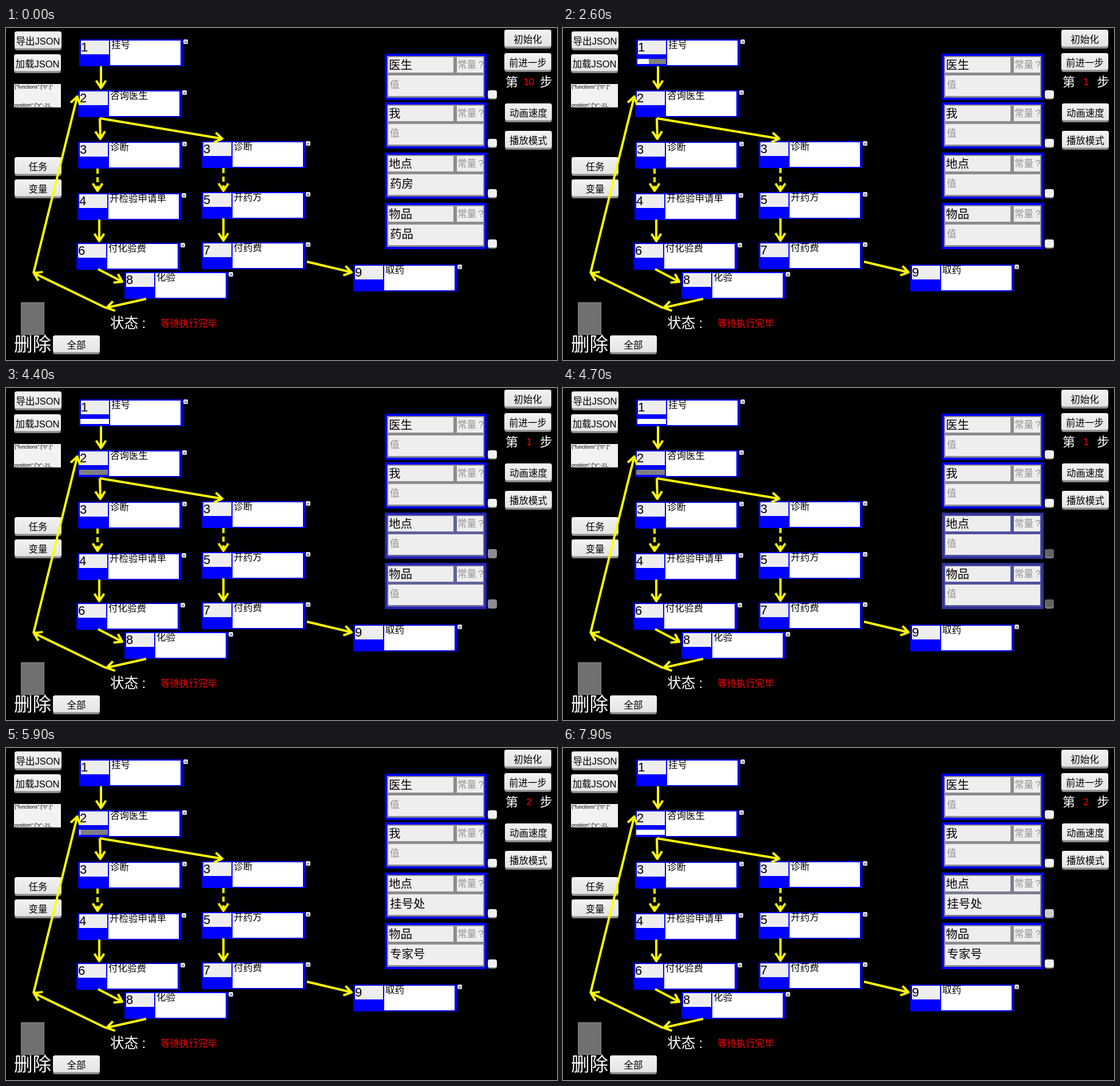
Write an HTML page with a canvas that moves like this. It is 963 px wide and 581 px high and loops after 8000 ms.

```html
<!DOCTYPE html>
<html lang="zh-CN">
<head>
<meta charset="utf-8">
<style>
html, body { margin: 0; width: 100%; height: 100%; overflow: hidden; background: #000; }
canvas { display: block; }
</style>
</head>
<body>
<canvas id="stage" width="963" height="581"></canvas>
<script>
const ctx = document.getElementById('stage').getContext('2d');
const LOOP = 8000, TICK = 100;
const BLUE = '#00f', PALE = '#eee', GREY = '#808080', FAINT = '#929292';

const tasks = [
  [128, 20, 1, '挂号'], [126, 109, 2, '咨询医生'], [126, 199, 3, '诊断'],
  [342, 198, 3, '诊断'], [125, 289, 4, '开检验申请单'], [342, 287, 5, '开药方'],
  [123, 376, 6, '付化验费'], [342, 375, 7, '付药费'], [207, 427, 8, '化验'],
  [607, 414, 9, '取药']
];

// tail x, y, tip x, y, dashed
const arrows = [
  [166, 67, 166, 107], [164, 158, 165, 196], [164, 158, 380, 194],
  [160, 246, 160, 287, 1], [380, 245, 380, 287, 1], [163, 335, 163, 375],
  [380, 333, 380, 374], [161, 422, 205, 445], [526, 409, 606, 428],
  [245, 474, 174, 490], [175, 490, 47, 428], [48, 429, 125, 118]
];

const buttons = [
  [15, 6, '导出JSON'], [14, 46, '加载JSON'], [15, 226, '任务'], [15, 265, '变量'],
  [82, 538, '全部'], [871, 3, '初始化'], [871, 44, '前进一步'],
  [872, 132, '动画速度'], [872, 180, '播放模式']
];

const clamp = v => Math.max(0, Math.min(1, v));
const mix = (from, to, k) =>
  `rgb(${from.map((v, i) => Math.round(v + (to[i] - v) * k))})`;

function rect(x, y, w, h, color) {
  ctx.fillStyle = color;
  ctx.fillRect(x, y, w, h);
}

function rounded(x, y, w, h, r, color) {
  ctx.fillStyle = color;
  ctx.beginPath();
  ctx.roundRect(x, y, w, h, r);
  ctx.fill();
}

// y is the vertical centre of the line
function text(s, x, y, size, color = '#000', align = 'left') {
  ctx.font = `${size}px "Liberation Sans", "Noto Sans CJK SC", "Noto Sans CJK", sans-serif`;
  ctx.textAlign = align;
  ctx.fillStyle = color;
  ctx.fillText(s, x, Math.round(y + size * 0.37));
}

function button([x, y, label], scale) {
  ctx.save();
  ctx.translate(x + 41, y + 16.5);
  ctx.scale(scale, scale);
  rounded(-41, -16.5, 82, 33, 4, '#8a8a8a');
  const shade = ctx.createLinearGradient(0, -16, 0, 13);
  shade.addColorStop(0, '#fff');
  shade.addColorStop(0.15, '#f0f0f0');
  shade.addColorStop(1, '#e4e4e4');
  rounded(-41, -16.5, 82, 29.5, 4, shade);
  text(label, 0, -0.5, 16.5, '#000', 'center');
  ctx.restore();
}

function task([x, y, id, label], bar) {
  rect(x, y, 181, 47, BLUE);
  rect(x + 3, y + 2, 49, 24, PALE);
  rect(x + 54, y + 2, 123, 43, '#fff');
  text(id, x + 3, y + 13, 22);
  text(label, x + 56, y + 9, 16.5);
  if (bar !== null) {
    rect(x + 2, y + 34, 50, 9, GREY);
    rect(x + 2, y + 34, Math.round(50 * bar), 9, '#fff');
  }
  rounded(x + 182, y, 8, 8, 2, '#e0e0e0');
  text('>', x + 186, y + 4, 8, '#000', 'center');
}

// A locked variable dims towards slate blue.
function variable(y, name, value, lock) {
  const x = 662;
  rect(x, y, 178, 81, mix([0, 0, 255], [50, 50, 150], lock));
  rect(x + 4, y + 4, 170, 73, mix([140, 140, 140], [80, 80, 160], lock));
  rect(x + 6, y + 6, 114, 27, PALE);
  rect(x + 126, y + 6, 46, 27, PALE);
  rect(x + 6, y + 38, 166, 36, PALE);
  text(name, x + 7, y + 19, 20.5);
  text('常量', x + 127, y + 18.5, 16.5, FAINT);
  text('?', x + 168, y + 18.5, 16.5, FAINT, 'center');
  if (value) text(value, x + 9, y + 54.5, 20.5);
  else text('值', x + 9, y + 54, 16.5, FAINT);
  rounded(842, y + 64, 16, 16, 4, '#888');
  rounded(842, y + 64, 16, 14, 4, mix([240, 240, 240], [100, 100, 100], lock));
}

function arrow([x1, y1, x2, y2, dashed], grown) {
  const len = Math.hypot(x2 - x1, y2 - y1) * grown - 2;
  if (len < 0) return;
  ctx.save();
  ctx.translate(x1, y1);
  ctx.rotate(Math.atan2(y2 - y1, x2 - x1));
  ctx.strokeStyle = '#ff0';
  ctx.lineWidth = 4;
  if (dashed) ctx.setLineDash([9, 6]);
  ctx.beginPath();
  ctx.moveTo(0, 0);
  ctx.lineTo(len, 0);
  ctx.stroke();
  ctx.setLineDash([]);
  ctx.lineJoin = 'round';
  ctx.beginPath();
  ctx.moveTo(len - 13, -8.5);
  ctx.lineTo(len, 0);
  ctx.lineTo(len - 13, 8.5);
  ctx.stroke();
  ctx.restore();
}

function state(t) {
  const waiting = '等待执行完毕';
  const rise = start => Math.sin(clamp((t - start) / 600) * Math.PI / 2);
  const lock = rise(4100) * clamp((5000 - t) / 200);
  const grow = start => t < start ? 1 : clamp((t - start) / 300);
  const s = {
    step: 10, status: waiting, place: '药房', item: '药品',
    bars: [null, null],
    locks: [lock + rise(7800), lock],
    grown: [grow(3900), grow(7600), grow(7600)],
    pressed: null
  };
  if (t >= 1100) Object.assign(s, { step: 0, status: '过程模式', place: '', item: '' });
  if (t >= 2300) {
    Object.assign(s, { step: 1, status: waiting });
    s.bars[0] = clamp((t - 2310) / 710);
  }
  if (t >= 4300) s.bars[1] = 0;
  if (t >= 4900) Object.assign(s, { status: '继续下一步', place: '挂号处', item: '专家号' });
  if (t >= 5900) {
    Object.assign(s, { step: 2, status: waiting });
    s.bars = [null, clamp((t - 5860) / 850)];
  }
  if (t === 1000) s.pressed = '初始化';
  if (t === 2200 || t === 5800) s.pressed = '前进一步';
  return s;
}

function draw(t) {
  const s = state(t);
  rect(0, 0, 963, 581, '#000');

  rect(14, 98, 82, 41, '#f2f2f2');
  text('{"functions":{"0":{"', 15, 103, 8.5);
  text('position":{"x":-21,', 15, 135, 8.5);
  rect(26, 480, 41, 57, '#8c8c8c');
  rect(27, 481, 39, 55, '#707070');

  text('删除', 14, 553, 32.5, '#fff');
  text('状态', 182, 516, 24.7, '#fff');
  text(':', 241, 516, 24.7, '#fff', 'center');
  text(s.status, 270, 517, 16.5, '#f00');
  text('第', 873, 94, 22, '#fff');
  text('步', 933, 94, 22, '#fff');
  text(s.step, 914, 94, 16.5, '#f00', 'center');

  for (const b of buttons) button(b, b[2] === s.pressed ? 1.2 : 1);
  tasks.forEach((k, i) => task(k, s.bars[i] ?? null));
  variable(45, '医生', '', 0);
  variable(130, '我', '', 0);
  variable(218, '地点', s.place, s.locks[0]);
  variable(306, '物品', s.item, s.locks[1]);
  arrows.forEach((a, i) => arrow(a, s.grown[i] ?? 1));
}

// The picture advances in fixed ticks.
function loop() {
  draw(Math.floor(performance.now() % LOOP / TICK) * TICK);
  requestAnimationFrame(loop);
}
loop();
</script>
</body>
</html>
```
